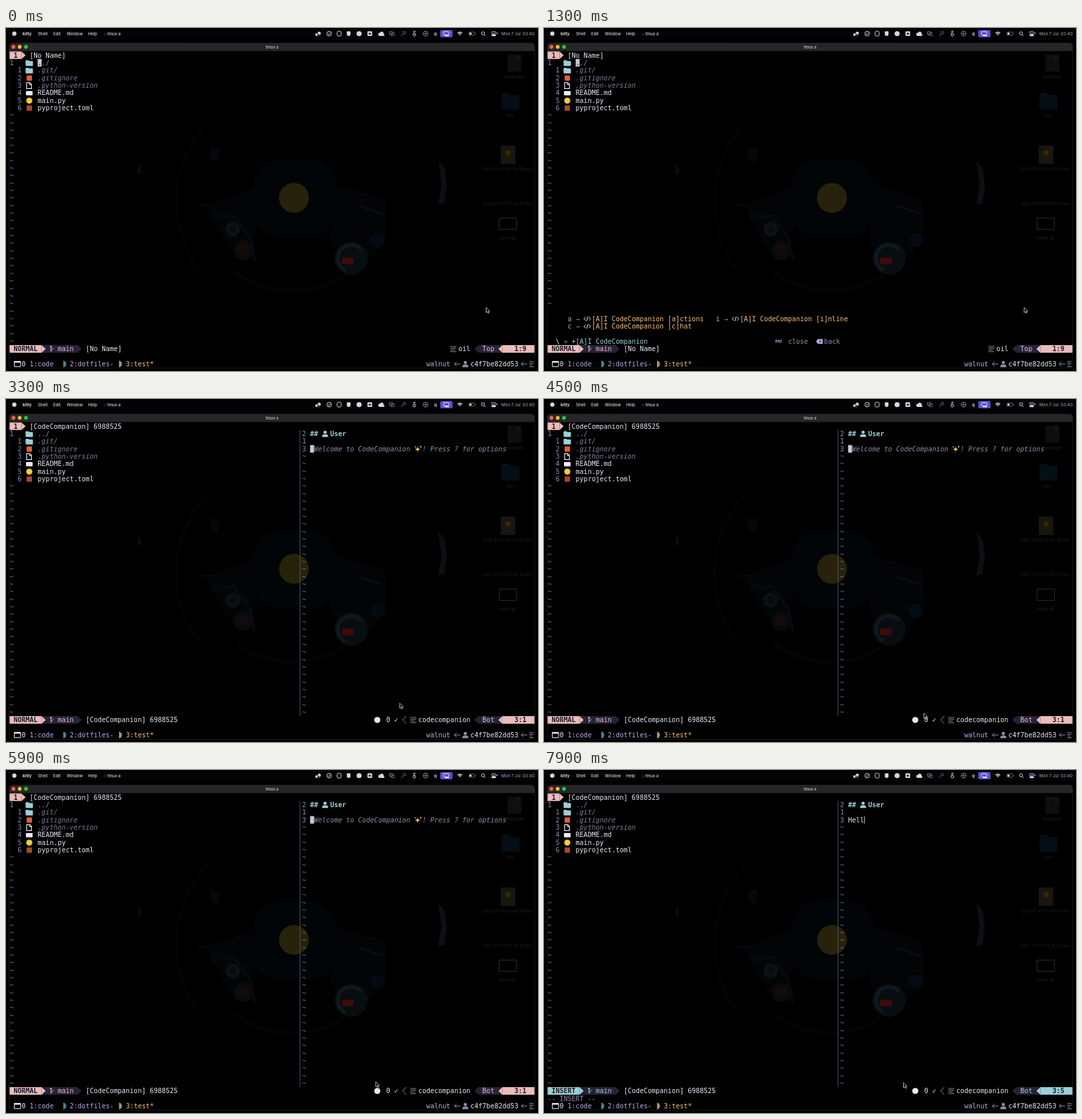
Write an HTML page with a canvas that moves like this. It is 800 px wide and 517 px high and loops after 8000 ms.

```html
<!DOCTYPE html>
<html lang="en">
<head>
<meta charset="utf-8">
<title>Terminal</title>
<style>
html, body { margin: 0; width: 100%; height: 100%; overflow: hidden; background: #000; }
canvas { display: block; width: 800px; height: 517px; }
</style>
</head>
<body>
<canvas id="stage"></canvas>
<script>
const LOOP = 8000, CW = 6.025, CH = 11.35, X0 = 5.4, Y0 = 35.4;
const MONO = '"DejaVu Sans Mono", monospace', SANS = 'Inter, sans-serif';
const C = { text: '#eceaf8', rose: '#ebbcba', foam: '#9ccfd8', iris: '#bcaaea', gold: '#f6c177',
  muted: '#75718d', subtle: '#908caa', split: '#524f67', dark: '#26233a', base: '#191724' };

const canvas = document.getElementById('stage');
const g = canvas.getContext('2d');
const dpr = window.devicePixelRatio || 1;
canvas.width = 800 * dpr;
canvas.height = 517 * dpr;
g.scale(dpr, dpr);

const cx = col => X0 + col * CW;
const mid = row => Y0 + (row + 0.5) * CH;

function rect(x, y, w, h, color, r = 0) {
  g.fillStyle = color;
  g.beginPath();
  g.roundRect(x, y, w, h, r);
  g.fill();
}
function box(x, y, w, h, color, r = 0, lw = 1) {
  g.strokeStyle = color;
  g.lineWidth = lw;
  g.beginPath();
  g.roundRect(x, y, w, h, r);
  g.stroke();
}
function disc(x, y, r, color) {
  g.fillStyle = color;
  g.beginPath();
  g.arc(x, y, r, 0, 7);
  g.fill();
}
function ring(x, y, r, color, lw = 1, from = 0, to = Math.PI * 2) {
  g.strokeStyle = color;
  g.lineWidth = lw;
  g.beginPath();
  g.arc(x, y, r, from, to);
  g.stroke();
}
function poly(points, color) {
  g.fillStyle = color;
  g.beginPath();
  points.forEach(p => g.lineTo(...p));
  g.closePath();
  g.fill();
}
function line(points, color, lw = 1) {
  g.strokeStyle = color;
  g.lineWidth = lw;
  g.beginPath();
  points.forEach(p => g.lineTo(...p));
  g.stroke();
}
function label(s, x, y, size, color, weight = 400, align = 'left') {
  g.font = `${weight} ${size}px ${SANS}`;
  g.textAlign = align;
  g.fillStyle = color;
  g.fillText(s, x, y);
}

// Terminal cell helpers
function put(col, row, s, color = C.text, style = '') {
  g.font = `${style} 10.01px ${MONO}`;
  g.textAlign = 'left';
  g.fillStyle = color;
  g.fillText(s, cx(col), mid(row) + 3.6);
}
function cells(col, row, n, color) {
  rect(cx(col), Y0 + row * CH, n * CW, CH, color);
}
function wedge(col, row, dir, color) {
  const x = cx(dir > 0 ? col : col + 1), y = Y0 + row * CH;
  poly([[x, y], [x + dir * CW, y + CH / 2], [x, y + CH]], color);
}
function person(col, row, color) {
  const x = cx(col) + 4.5, y = mid(row);
  disc(x, y - 2.2, 2.4, color);
  rect(x - 4.5, y + 0.7, 9, 4, color, [3, 3, 0.5, 0.5]);
}
function bars(col, row, color, w = 9) {
  for (let i = 0; i < 4; i++) rect(cx(col), mid(row) - 4.2 + i * 2.6, i === 2 ? w - 2 : w, 1, color);
}
function backArrow(col, row) {
  const x = cx(col), y = mid(row);
  line([[x + 9, y], [x, y]], C.subtle);
  line([[x + 3.5, y - 3.5], [x, y], [x + 3.5, y + 3.5]], C.subtle);
}
function folder(x, y, color) {
  rect(x, y - 4.2, 5, 4, color, 1);
  rect(x, y - 3, 11, 7.4, color, 1);
}

function wallpaper() {
  rect(0, 0, 800, 517, '#000');
  ring(430, 262, 174, '#030405', 4, 2.5, 3.9);
  ring(430, 250, 146, '#030405', 6, 1, 2.2);
  rect(372, 198, 124, 118, '#020507', 40);
  poly([[300, 268], [372, 240], [380, 290], [352, 352], [326, 318]], '#020406');
  poly([[494, 235], [570, 258], [572, 322], [520, 372], [488, 320]], '#020406');
  poly([[308, 180], [322, 182], [318, 204], [306, 196]], '#04070b');
  rect(308, 276, 20, 14, '#03070c', 5);
  line([[288, 267], [312, 266]], '#07090b', 2);
  line([[326, 285], [342, 282], [368, 318], [374, 350]], '#060b10', 4);
  disc(341, 303, 12, '#070c11');
  ring(341, 303, 8, '#14181c', 2);
  disc(357, 335, 15, '#070b0e');
  disc(356, 334, 9, '#150a0a');
  line([[530, 268], [566, 280]], '#0a0e12', 3);
  disc(559, 319, 11, '#040a11');
  disc(519, 347, 25, '#070d10');
  ring(519, 347, 20, '#10191d', 5, 2, 5.6);
  rect(505, 346, 18, 10, '#3e0a0a', 2);
  disc(433, 256, 22.5, '#27230a');
  poly([[650, 200], [660, 212], [663, 240], [659, 264], [650, 266], [655, 235]], '#0a1014');
  rect(198, 208, 5, 12, '#0d0b09', 2);
}

function desktop() {
  const dim = '#1c1c1c';
  rect(754, 40, 21, 26, '#0e0e0e', 1);
  poly([[768, 40], [775, 47], [768, 47]], '#171717');
  rect(745, 98, 12, 6, '#04131a', 2);
  rect(745, 101, 27, 22, '#040f15', 2);
  rect(744, 177, 22, 28, '#151515', 1);
  rect(748, 181, 14, 19, '#1d1608');
  disc(755, 188, 4, '#33270b');
  box(741.5, 286.5, 26, 17, '#2a2a2a');
  [['eqs8.eaml', 764, 76], ['test', 758, 134], ['2025-07-07 01-24-19.mov', 754, 215],
   ['2025-07-07 01-28-15.mov', 754, 267], ['movie.gif', 754, 319]]
    .forEach(([s, x, y]) => label(s, x, y, 5.9, dim, 500, 'center'));
}

function menuBar() {
  const w = '#d8d8da', y = 8.5;
  rect(0, 0, 800, 17, '#030306');
  disc(12.5, y, 3.2, w);
  label('kitty', 25, 10.7, 6.2, w, 700);
  [['Shell', 48], ['Edit', 71], ['Window', 91.5], ['Help', 123.5], [':: tmux a', 147]]
    .forEach(([s, x]) => label(s, x, 10.7, 6.2, w, 500));
  disc(467, 10, 2, w); disc(471, 8, 2.4, w); ring(470, 10.5, 1.6, '#555');
  ring(486, y, 3.5, w); line([[484, 8.5], [485.7, 10], [488, 7]], w);
  box(498, 5, 6, 7, w, 1.5);
  rect(512.5, 5, 5.5, 7, w, [1, 1, 3, 3]);
  disc(531, y, 3.8, w);
  rect(543.5, 5, 7, 7, w, 1); disc(547, y, 1.6, '#111');
  disc(562, 9.5, 2.3, w); disc(565, 8.3, 2.8, w); rect(561, 9, 8, 3, w, 1.5);
  box(576.5, 5.5, 5, 4, '#6c6c70'); box(579, 7.5, 5, 4, '#6c6c70');
  ring(599, 7, 2, '#626266'); line([[597.5, 8.5], [594, 12]], '#626266');
  ring(614, 10, 2, w); line([[614, 8], [613, 5], [616, 5]], w);
  ring(631, y, 3.7, '#77777b'); line([[627.5, y], [634.5, y]], '#77777b'); line([[631, 5], [631, 12]], '#77777b');
  label('q', 643.5, 10.8, 7, w, 600);
  rect(653, 3, 18.5, 11, '#5d50cc', 2.5);
  box(658, 5.5, 8, 5, '#fff', 1, 0.8); rect(660, 11, 6, 1.2, '#fff');
  [1.3, 3.2, 5.1].forEach(r => ring(682.5, 11.3, r, w, 1.2, -2.35, -0.8));
  box(696, 6, 9, 5, '#77777b', 1.3, 0.8); rect(697, 7, 3, 3, w); rect(705.7, 7.5, 0.8, 2, '#77777b');
  ring(717.3, 8, 2.3, w); line([[719, 9.8], [721, 11.8]], w);
  box(730, 5.5, 6.5, 2.6, w, 1.3, 0.8); rect(730, 9.3, 6.8, 3, w, 1.5); disc(738.3, 8, 1.3, '#5b7cff');
  label('Mon 7 Jul  03:40', 745, 10.7, 6.2, '#96969b', 500);
}

function titleBar() {
  rect(5, 22.8, 790, 12, '#262628', [5, 5, 0, 0]);
  box(5, 22.8, 790, 490, '#2c2c2e', 5, 0.6);
  ['#ff5f57', '#febc2e', '#28c840'].forEach((c, i) => disc(11.2 + i * 9.4, 28.4, 2.8, c));
  label('tmux a', 400, 30.5, 5.9, '#b9b9bc', 600, 'center');
}

function fileIcon(kind, row) {
  const x = cx(4), y = mid(row) + 0.3;
  if (kind === 'dir') folder(x, y, C.foam);
  else if (kind === 'square') rect(x + 1.5, y - 4, 8, 8, '#ee5a34', 1);
  else if (kind === 'page') {
    line([[x + 6, y - 4.5], [x + 1.5, y - 4.5], [x + 1.5, y + 4.5], [x + 8.8, y + 4.5], [x + 8.8, y - 1.8], [x + 6, y - 4.5]], C.text, 1.2);
    line([[x + 5.6, y - 4], [x + 5.6, y - 1.4], [x + 9, y - 1.4]], C.text);
  }
  else if (kind === 'text') rect(x + 0.5, y - 3.2, 10, 6.6, C.text, 1);
  else if (kind === 'disc') disc(x + 5.5, y, 4.6, '#ffc93a');
  else rect(x + 1.5, y - 4, 8, 8, '#a9482a', 1);
}

function fileList(focused) {
  [['dir', '../', 1], ['dir', '.git/', 1], ['square', '.gitignore', 1], ['page', '.python-version', 1],
   ['text', 'README.md'], ['disc', 'main.py'], ['block', 'pyproject.toml']]
    .forEach(([kind, name, hidden], i) => {
      const row = i + 1;
      put(i ? 2 : 0, row, String(i || 1), C.subtle);
      fileIcon(kind, row);
      put(7, row, name, hidden ? (i ? '#827d99' : C.subtle) : C.text, hidden && i ? 'italic' : '');
    });
  if (focused) {
    cells(7, 1, 1, '#c9c8cf');
    put(7, 1, '.', C.base);
  }
}

function tildes(col, from, to) {
  for (let r = from; r <= to; r++) put(col, r, '~', C.muted);
}

function codeIcon(col, row) {
  const x = cx(col), y = mid(row);
  line([[x + 3, y - 2.7], [x + 0.6, y], [x + 3, y + 2.7]], C.text);
  line([[x + 6.6, y - 3.5], [x + 4.4, y + 3.5]], C.text);
  line([[x + 8, y - 2.7], [x + 10.4, y], [x + 8, y + 2.7]], C.text);
}

function keyHints() {
  [[5, 35, 'a', '[a]ctions'], [42, 35, 'i', '[i]nline'], [5, 36, 'c', '[c]hat']].forEach(([col, row, key, name]) => {
    put(col, row, key, C.iris);
    put(col + 2, row, '→', C.subtle);
    codeIcon(col + 4, row);
    put(col + 6, row, '[A]I CodeCompanion ' + name, C.gold);
  });
  put(2, 38, '\\');
  put(4, 38, '»', C.subtle);
  put(6, 38, '+[A]I CodeCompanion', C.foam);
  label('ESC', 348, mid(38) + 2, 5.2, C.iris, 800);
  put(60, 38, 'close', C.subtle);
  const x = cx(67), y = mid(38);
  poly([[x, y], [x + 3, y - 3.6], [x + 10, y - 3.6], [x + 10, y + 3.6], [x + 3, y + 3.6]], C.iris);
  line([[x + 4.5, y - 1.7], [x + 8, y + 1.7]], C.base);
  line([[x + 8, y - 1.7], [x + 4.5, y + 1.7]], C.base);
  put(69, 38, 'back', C.subtle);
}

function chatPane(insert, typed) {
  rect(441.6, Y0 + CH, 1, 38 * CH, C.split);
  put(73, 1, '2', C.subtle);
  put(73, 2, '1', C.subtle);
  put(73, 3, '3', C.subtle);
  put(75, 1, '##', C.foam, 'bold');
  person(78, 1, C.foam);
  put(80, 1, 'User', C.foam, 'bold');
  tildes(73, 4, 38);
  if (insert) {
    put(75, 3, typed);
    rect(cx(75 + typed.length), Y0 + 3 * CH, 1, CH, '#d8d7df');
    return;
  }
  cells(75, 3, 1, '#c9c8cf');
  put(76, 3, 'Welcome to CodeCompanion', C.subtle, 'italic');
  [[5, 0.5, 4], [9.5, -3.2, 2], [1.5, -3, 1.7]].forEach(([dx, dy, r]) => {
    const x = cx(101) + dx, y = mid(3) + dy, k = r * 0.27;
    poly([[x, y - r], [x + k, y - k], [x + r, y], [x + k, y + k], [x, y + r], [x - k, y + k], [x - r, y], [x - k, y - k]], '#ffc94d');
  });
  put(103, 3, '! Press ? for options', C.subtle, 'italic');
}

function statusLine(chat, insert, typed) {
  const r = 39, main = insert ? C.foam : C.rose, name = chat ? '[CodeCompanion] 6988525' : '[No Name]';
  cells(0, 0, 3, C.rose);
  wedge(3, 0, 1, C.rose);
  put(1, 0, '1', C.base, 'bold');
  put(5, 0, name);

  cells(8, r, 9, C.dark);
  wedge(17, r, 1, C.dark);
  cells(0, r, 8, main);
  wedge(8, r, 1, main);
  put(1, r, insert ? 'INSERT' : 'NORMAL', C.base, 'bold');
  const bx = cx(10) + 2, by = mid(r);
  line([[bx, by + 4.5], [bx, by - 3.5]], main);
  line([[bx, by + 2], [bx + 3, by], [bx + 3, by - 1.5]], main);
  disc(bx, by - 3.5, 1.2, main);
  put(12, r, 'main', main);
  put(19, r, name);

  if (chat) {
    disc(558.3, by, 4.6, C.text);
    put(94, r, '0');
    put(96, r, '✓');
    line([[cx(99), by - 5.5], [cx(98) + 0.5, by], [cx(99), by + 5.5]], C.subtle);
  }
  bars(chat ? 100 : 110, r, C.subtle);
  put(chat ? 102 : 112, r, chat ? 'codecompanion' : 'oil');
  wedge(116, r, -1, C.dark);
  cells(117, r, 6, C.dark);
  put(118, r, chat ? 'Bot' : 'Top', main);
  wedge(122, r, -1, main);
  cells(123, r, 8, main);
  put(126, r, chat ? '3:' + (typed.length + 1) : '1:9', C.base, 'bold');
  if (insert) put(0, 40, '-- INSERT --', C.subtle);
}

function sessionBar() {
  const r = 41, y = mid(r);
  box(cx(1) + 1, y - 4, 9.5, 8, C.text);
  rect(cx(1) + 1, y - 4, 9.5, 2, C.text);
  put(3, r, '0');
  put(5, r, '1:code', C.iris);
  put(15, r, '2:dotfiles-', C.iris);
  put(29, r, '3:test*', C.gold);
  [[13.4, '#4b8296'], [27.3, '#9a9478']].forEach(([col, color]) => {
    g.fillStyle = color;
    g.beginPath();
    g.ellipse(cx(col), y, 4.5, 5, 0, -Math.PI / 2, Math.PI / 2);
    g.fill();
  });
  put(104, r, 'walnut', C.iris);
  backArrow(111, r);
  person(113, r, C.subtle);
  put(115, r, 'c4f7be82dd53');
  backArrow(127.7, r);
  bars(129.7, r, C.subtle, 6.5);
}

// Pointer keys: time, x, y
const PATH = [[2850, 722, 421.4], [3300, 592, 458.6], [3700, 562, 475], [3900, 551, 473], [4200, 579, 478],
  [4500, 571, 473.5], [4700, 572, 480], [4900, 553, 488], [5200, 576, 484], [5500, 580, 473.5],
  [5900, 556, 470], [6300, 540.5, 471.3]];

function pointer(t) {
  let i = PATH.findIndex(k => k[0] > t);
  if (i < 0) i = PATH.length;
  const a = PATH[Math.max(0, i - 1)], b = PATH[Math.min(i, PATH.length - 1)];
  const u = b[0] > a[0] ? (t - a[0]) / (b[0] - a[0]) : 0, e = u * u * (3 - 2 * u);
  const x = a[1] + (b[1] - a[1]) * e, y = a[2] + (b[2] - a[2]) * e;
  const shape = [[0, 0], [0, 7.6], [1.8, 6], [3, 8.6], [4.3, 8], [3.2, 5.5], [5.5, 5.4]].map(p => [x + p[0], y + p[1]]);
  poly(shape, '#000');
  line([...shape, shape[0]], '#e0e0e0', 0.8);
}

function draw(t) {
  const chat = t >= 1800, hints = t >= 1000 && !chat, insert = t >= 6900;
  const typed = 'Hell'.slice(0, Math.max(0, 1 + Math.floor((t - 7400) / 160)));
  wallpaper();
  desktop();
  menuBar();
  titleBar();
  fileList(!chat);
  tildes(0, 8, hints ? 33 : 38);
  if (hints) keyHints();
  if (chat) chatPane(insert, typed);
  statusLine(chat, insert, typed);
  sessionBar();
  pointer(t);
}

const start = performance.now();
function tick() {
  draw((performance.now() - start) % LOOP);
  requestAnimationFrame(tick);
}
tick();
</script>
</body>
</html>
```
